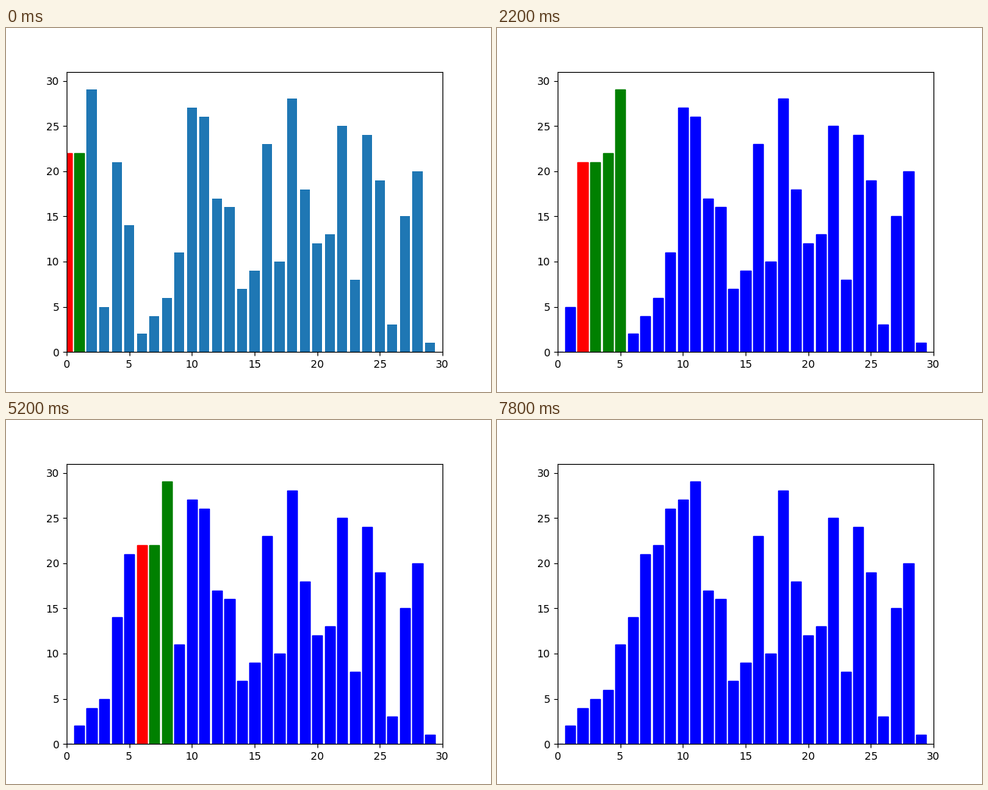
These frames come from a looping animation (640x480 px, 8000 ms). A matplotlib script:

```python
from itertools import islice

import matplotlib.pyplot as plt
from matplotlib.animation import FuncAnimation

# The shuffled integers 0..29 to be sorted
DATA = [22, 0, 29, 5, 21, 14, 2, 4, 6, 11, 27, 26, 17, 16, 7,
        9, 23, 10, 28, 18, 12, 13, 25, 8, 24, 19, 3, 15, 20, 1]
N = len(DATA)
STEPS = 40
INTERVAL = 200


def insertion_sort(values):
    """Yield (heights, colors) after every shift and every placement."""
    a = list(values)
    colors = [None] * N  # None keeps the default bar style
    for i in range(1, N):
        key, j = a[i], i - 1
        while j >= 0 and a[j] > key:
            a[j + 1] = a[j]
            colors[j:j + 2] = "red", "green"
            yield a[:], colors[:]
            j -= 1
        a[j + 1] = key
        colors = ["blue"] * N
        yield a[:], colors[:]


states = list(islice(insertion_sort(DATA), STEPS))

fig, ax = plt.subplots(figsize=(6.4, 4.8), dpi=100)
bars = ax.bar(range(N), DATA)
ax.set(xlim=(0, N), ylim=(0, N + 1))


def update(k):
    for bar, height, color in zip(bars, *states[k]):
        bar.set_height(height)
        bar.set_facecolor(color or "C0")
        bar.set_edgecolor(color or "none")
    return bars


anim = FuncAnimation(fig, update, frames=STEPS, interval=INTERVAL,
                     repeat=True, repeat_delay=0, blit=False)
plt.show()
```
